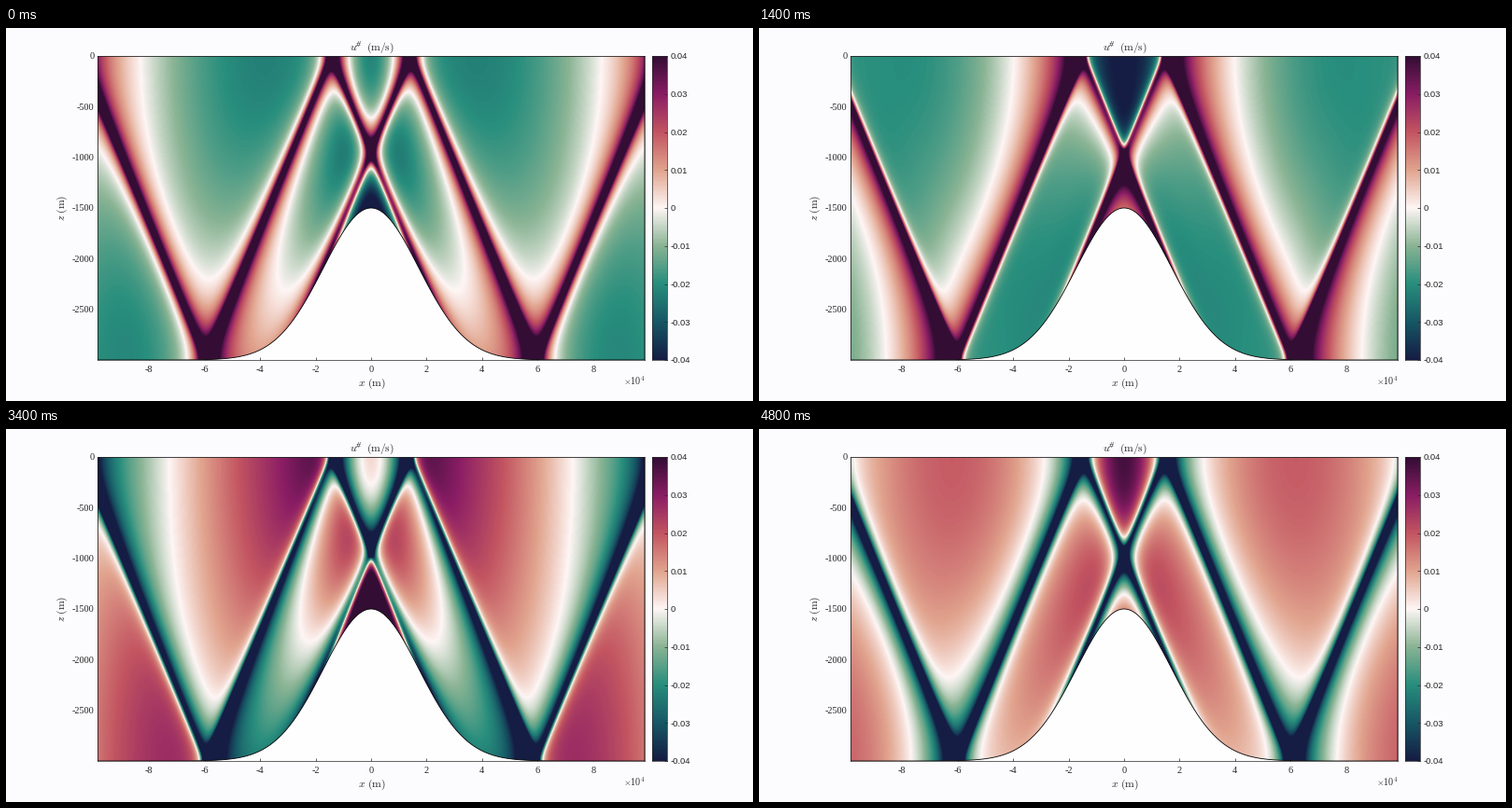
Recreate the animation shown at these times as a matplotlib script. Size 800 by 400 pixels, loop 5 s.

```python
import numpy as np
import matplotlib.pyplot as plt
from matplotlib.animation import FuncAnimation
from matplotlib.colors import LinearSegmentedColormap

plt.rcParams["mathtext.fontset"] = "cm"

WIDTH, HEIGHT, DPI = 800, 400, 100
FRAMES, INTERVAL = 25, 200
FRAMES_PER_TIDE = 40
DEPTH, RIDGE, RIDGE_WIDTH = 3000.0, 1500.0, 2.43e4
BEAM_SLOPE = 0.0662
X_MAX, U_MAX = 9.86e4, 0.04
LEFT, TOP, COLS, ROWS = 98, 30, 586, 326
BAR_LEFT, BAR_WIDTH = 691.5, 16
PAPER, INK = "#fcfbfd", "#262626"
HALF_CELL = DEPTH / BEAM_SLOPE


def ridge(x):
    return RIDGE * np.exp(-(x / RIDGE_WIDTH) ** 2)


def reach(x):
    """Horizontal distance a beam covers from seabed to surface."""
    return (DEPTH - ridge(x)) / BEAM_SLOPE


def reach_slope(x):
    return 2 * x / RIDGE_WIDTH**2 * ridge(x) / BEAM_SLOPE


# Internal tide as u = p(x + z/s) + p(x - z/s): p is even, is reflected
# at the seabed, and holds only outgoing modes away from the ridge.
seabed_x = np.linspace(-2.4e5, 0, 24001)
seabed_char = seabed_x + reach(seabed_x)
modes = np.arange(1, 181)


def left_basis(char):
    y = np.interp(char, seabed_char, seabed_x)
    gain = (1 - reach_slope(y)) / (1 + reach_slope(y))
    phase = np.outer(y - reach(y), modes) * np.pi / HALF_CELL
    return gain, gain[:, None] * np.exp(-1j * phase)


def solve_modes():
    x = np.linspace(0, HALF_CELL, 1600)
    down, up = 1 - reach_slope(x), 1 + reach_slope(x)
    gain_a, basis_a = left_basis(x - reach(x))
    gain_b, basis_b = left_basis(-x - reach(x))
    matrix = down[:, None] * basis_a - up[:, None] * basis_b
    return np.linalg.lstsq(matrix, up * gain_b - down * gain_a, rcond=None)[0]


char_axis = np.linspace(0, 1.5e5, 5001)
base, basis = left_basis(-char_axis)
char_wave = base + basis @ solve_modes()


def wave(x, z):
    """Complex baroclinic current for unit forcing."""
    shift = z / BEAM_SLOPE
    total = sum(np.interp(np.abs(x + s * shift), char_axis, char_wave)
                for s in (-1, 1))
    return total - 2 * DEPTH / (DEPTH - ridge(x))


# Surface currents above the ridge and far from it set the forcing.
unit = wave(np.array([0, -6e4]), 0)
surface = np.array([-0.021 - 0.0357j, -0.0171 - 0.0072j])
forcing = np.vdot(unit, surface) / np.vdot(unit, unit)

grid_x, grid_z = np.meshgrid(
    ((np.arange(COLS) + 0.5) / COLS * 2 - 1) * X_MAX,
    -(np.arange(ROWS) + 0.5) / ROWS * DEPTH)
tide = forcing * wave(grid_x, grid_z)


def current(frame):
    return (tide * np.exp(-2j * np.pi * frame / FRAMES_PER_TIDE)).real


curl = LinearSegmentedColormap.from_list("curl", [
    "#151d44", "#175866", "#288e7d", "#8ab494", "#fef6f5",
    "#e1a48e", "#c35561", "#8b1d65", "#340d35"])

fig = plt.figure(figsize=(WIDTH / DPI, HEIGHT / DPI), dpi=DPI, facecolor=PAPER)


def add_axes(x, y, w, h):
    ax = fig.add_axes([x / WIDTH, 1 - (y + h) / HEIGHT, w / WIDTH, h / HEIGHT],
                      facecolor="#fefefe")
    for spine in ax.spines.values():
        spine.set(linewidth=0.5, color=INK)
    ax.tick_params(direction="in", length=2.5, width=0.5, color=INK)
    return ax


def label(x, y, text, px, ha="center", font="Liberation Serif", **kw):
    fig.text(x / WIDTH, 1 - y / HEIGHT, text, fontsize=px * 72 / DPI, ha=ha,
             va=kw.pop("va", "baseline"), family=font, color=INK, **kw)


ax = add_axes(LEFT, TOP, COLS, ROWS)
ax.set_axisbelow(True)
image = ax.imshow(current(0), cmap=curl, vmin=-U_MAX, vmax=U_MAX,
                  extent=(-X_MAX, X_MAX, -DEPTH, 0), aspect="auto",
                  interpolation="nearest", zorder=1)
line_x = np.linspace(-X_MAX, X_MAX, 600)
water, = ax.fill(np.r_[line_x, X_MAX, -X_MAX],
                 np.r_[ridge(line_x) - DEPTH, 0, 0],
                 facecolor="none", edgecolor="black", lw=0.6, zorder=2)
image.set_clip_path(water)
ax.set(xlim=(-X_MAX, X_MAX), ylim=(-DEPTH, 0),
       xticks=np.arange(-8, 9, 2) * 1e4, yticks=np.arange(-2500, 1, 500),
       xticklabels=[], yticklabels=[])

for k in range(-8, 9, 2):
    label(LEFT + COLS / 2 * (1 + k * 1e4 / X_MAX), 369.3, str(k), 10.3)
for z in range(-2500, 1, 500):
    label(94.5, TOP - z / DEPTH * ROWS + 3.3, str(z), 10.3, ha="right")

label(367.5, 24, "$u$", 11.6, ha="left")
label(374.5, 20.5, "#", 9.5, ha="left", style="italic")
label(386.5, 24, r"$\mathrm{(m/s)}$", 11.6, ha="left")
label(391.5, 383.5, r"$x\ \mathrm{(m)}$", 11.6)
label(60.3, 193, r"$z\ \mathrm{(m)}$", 11.6, va="center", rotation=90)
label(684, 382.7, r"$\times10^4$", 10, ha="right")

bar = add_axes(BAR_LEFT, TOP, BAR_WIDTH, ROWS)
bar.imshow(np.linspace(-U_MAX, U_MAX, 256)[:, None], cmap=curl, origin="lower",
           extent=(0, 1, -U_MAX, U_MAX), aspect="auto")
bar.yaxis.tick_right()
bar.set(xticks=[], yticks=np.arange(-4, 5) / 100, yticklabels=[])
for k in range(-4, 5):
    label(712, TOP + (4 - k) / 8 * ROWS + 3.3, f"{k / 100:.2f}" if k else "0",
          9.5, ha="left", font="Liberation Sans")


def update(frame):
    image.set_data(current(frame))
    return (image,)


animation = FuncAnimation(fig, update, frames=FRAMES, interval=INTERVAL,
                          repeat=True, repeat_delay=0)
plt.show()
```
